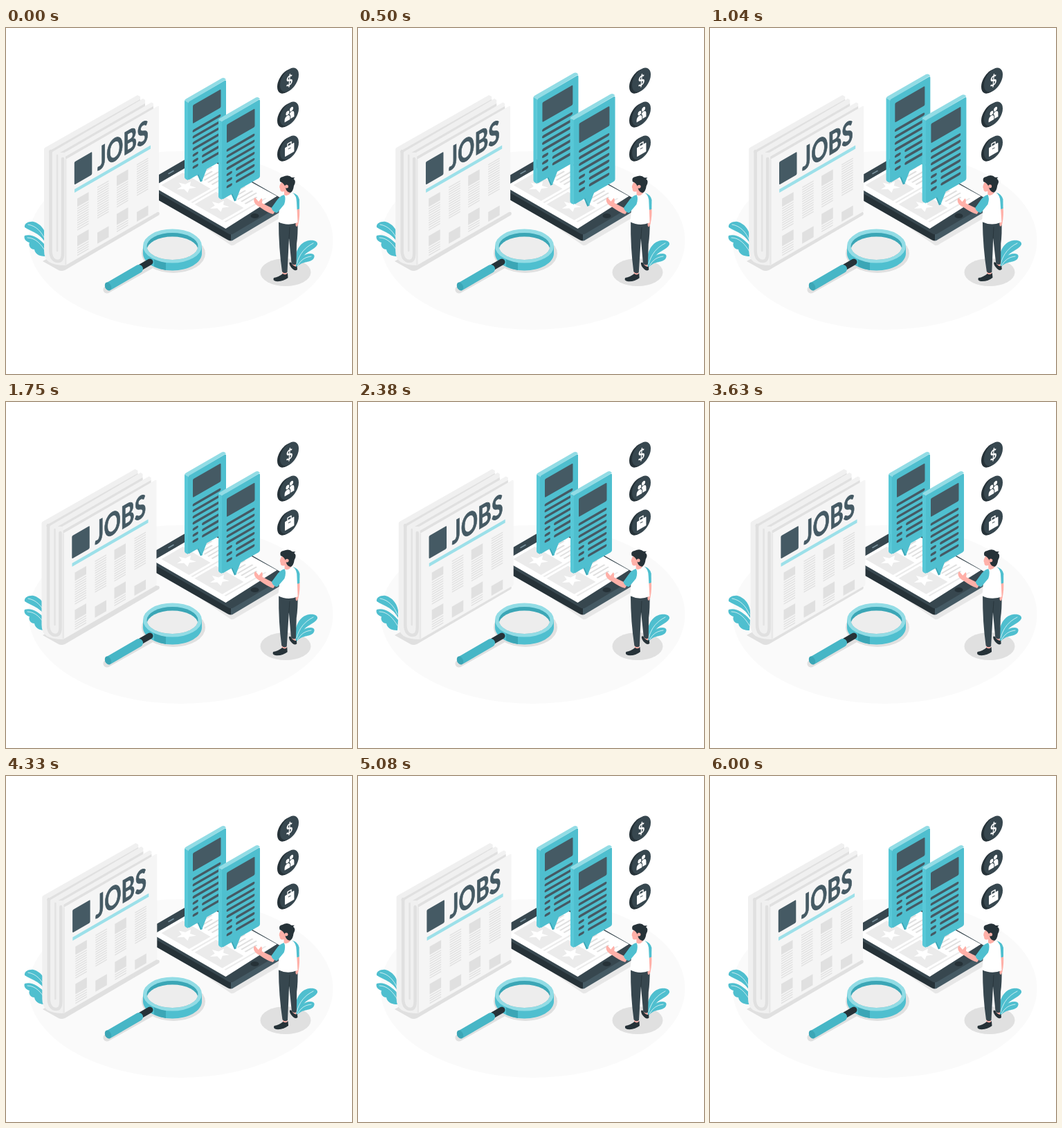
Write an HTML page that moves like this. It is 500x500 px and loops after 6.04 s.

```html
<!DOCTYPE html>
<html lang="en">
<head>
<meta charset="utf-8">
<title>Job search</title>
<style>
html, body { margin: 0; width: 100%; height: 100%; overflow: hidden; background: #fff; }
svg { display: block; width: 100%; height: 100%; }
.teal { fill: #4fbfcf; }
.pale { fill: #92dce5; }
.deep { fill: #3ba6b6; }
.ink { fill: #263238; }
.slate { fill: #37474f; }
.steel { fill: #455a64; }
.grey { fill: #e0e0e0; }
.page { fill: #f5f5f5; }
.skin { fill: #ffb0a8; }
.white { fill: #fff; }
.line { fill: none; stroke-linecap: round; stroke-linejoin: round; }
</style>
</head>
<body>
<svg viewBox="0 0 500 500">
  <defs>
    <g id="bubble">
      <path class="pale" d="M258 105.500Q258 103.500 260 102.500L312 72.500Q314 71.500 316 72.500L318 74.500L263 107.500Z"/>
      <path fill="#58c8d7" d="M258 105L263 107.500V220L259.500 218.200Q258 217 258 215.500Z"/>
      <path class="deep" d="M276 211L281 222.500L284 221L279 209Z"/>
      <path class="teal" d="M263 109Q263 107 265 106L316 76Q318 75 318 77V186Q318 188 316 189.200L290 204L283 222L278 211.500L265 219Q263 220 263 218Z"/>
      <g id="copy" transform="matrix(1 -.577 0 1 0 0)">
        <rect class="steel" x="270" y="267.500" width="40.500" height="26.500" rx="1.500"/>
      </g>
    </g>
    <g id="disc">
      <circle class="ink" r="15.600" transform="matrix(.866 -.5 0 1 405.500 77.200)"/>
      <circle class="ink" r="15.600" transform="matrix(.866 -.5 0 1 407.500 76.200)"/>
      <circle class="slate" r="15.600" transform="matrix(.866 -.5 0 1 409.500 75)"/>
    </g>
    <clipPath id="hole"><ellipse cx="240.500" cy="315.500" rx="37" ry="19.500"/></clipPath>
  </defs>

  <ellipse cx="252.500" cy="307" rx="220" ry="129" fill="#fafafa"/>

  <!-- left plant -->
  <path class="teal" d="M58 312C49 296 38 295 27 288C26 282 33 279 40 280C50 283 56 291 58 301Z"/>
  <path class="teal" d="M57 330C47 330 42 326 41 320C36 320 32 315 34 310C29 309 25 304 27 300C36 297 47 302 58 315Z"/>
  <path class="line" stroke="#fff" stroke-width=".7" d="M32 284C44 286 52 295 57 307M31 303C43 303 51 313 57 323"/>

  <!-- phone -->
  <path class="grey" opacity=".7" d="M205 232L325 314Q328 315 332 312L397 274V262L320 222Z"/>
  <path class="ink" d="M198 225L325 298V307.500Q323 307.500 320 306L198 236Z"/>
  <path class="steel" d="M325 298L404 252V258Q404 261 401 263L329 306Q327 307.500 325 307.500Z"/>
  <path class="slate" d="M201 223.500L276 180Q279.500 178 283 180L403 249Q407 251 403 253L329 297Q325 299.500 321 297L201 227Q197 225 201 223.500Z"/>
  <path class="white" d="M212.500 229.300L287 186L391.500 243L317.500 290Z"/>
  <path class="line" stroke="#78909c" stroke-width="1.600" d="M235 210.500L242 206.500"/>
  <ellipse class="ink" cx="359.500" cy="271.500" rx="6" ry="3.600"/>
  <g id="screen" transform="matrix(1 .577 1 -.577 212.500 229.300)"></g>

  <g id="bubbles"><use href="#bubble"/><use href="#bubble" x="49" y="28"/></g>

  <!-- newspaper -->
  <path class="grey" d="M53 337L76 350Q80 352 85 350L220 271Q223 269 221 266L190 260Z"/>
  <g id="paper">
    <path fill="#f0f0f0" d="M55 175Q55 173.500 57 172.500L190 97L194 99V190L86 343Q70 343 62 338Q55 333 55 322Z"/>
    <path class="grey" d="M62 178L194 103V180H62Z"/>
    <path fill="#f0f0f0" d="M67 179L198 102L201 104V190H67Z"/>
    <path class="grey" d="M73 183L201 109V190H73Z"/>
    <path fill="#f2f2f2" d="M76 185L210 107.500L213 109V200H76Z"/>
    <path class="grey" d="M82 188L213 113V200H82Z"/>
    <path fill="#f0f0f0" d="M67 180H86V335H67Z"/>
    <path class="line" stroke="#e0e0e0" stroke-width="4.500" stroke-linecap="butt" d="M64.500 178V322C64.500 333 70 337 75 337C80 337 82 333 82 326V189"/>
    <path class="line" stroke="#e3e3e3" stroke-width="2.500" d="M74 184V322"/>
    <path class="page" d="M86 190L219 113Q221 112 221 114V263Q221 265 219 266L86 343Z"/>
    <path fill="#e8e8e8" d="M85 190H87.500V342L85 343Z"/>
    <g id="columns" transform="matrix(1 -.577 0 1 0 0)">
      <rect class="steel" x="98.800" y="250.500" width="25.500" height="33" rx="1.500"/>
      <rect x="99" y="290" width="110" height="5" fill="#9ce0e9"/>
    </g>
    <text class="steel" stroke="#455a64" stroke-width=".9" transform="matrix(.67 -.388 0 1 132 206.500)" font-family="Lato, 'Open Sans', sans-serif" font-weight="700" font-size="45">JOBS</text>
  </g>

  <!-- magnifier -->
  <ellipse class="grey" cx="242" cy="326" rx="46" ry="28"/>
  <path class="line" stroke="#e0e0e0" stroke-width="11" d="M146 378L210 342"/>
  <path class="teal" d="M198 315V326C198 339 217 350.500 240.500 350.500S283 339 283 326V315Z"/>
  <path class="deep" d="M214 334V344.500Q222 348.500 231 350V339Z"/>
  <ellipse class="pale" cx="240.500" cy="315" rx="42.500" ry="24.500"/>
  <ellipse class="deep" cx="240.500" cy="315.500" rx="37" ry="19.500"/>
  <ellipse clip-path="url(#hole)" cx="240.500" cy="321" rx="37" ry="19.500" fill="#ededed"/>
  <path class="line" stroke="#263238" stroke-width="9" d="M195 345.500L208 338"/>
  <path class="line" stroke="#47b6c6" stroke-width="12" d="M149 373L192 348"/>
  <ellipse class="deep" cx="147.500" cy="373.500" rx="4.300" ry="6.300" transform="rotate(-25 147.500 373.500)"/>

  <!-- icons -->
  <use href="#disc"/><use href="#disc" y="49"/><use href="#disc" y="98"/>
  <text class="white" transform="matrix(.866 -.5 0 1 409.500 83)" text-anchor="middle" font-family="Lato, sans-serif" font-weight="700" font-size="20">$</text>
  <g class="white" transform="matrix(.866 -.5 0 1 409.500 124.500)">
    <circle cx="-3" cy="-3" r="2.900"/><circle cx="3.500" cy="-5.500" r="3"/>
    <path d="M-8 8V5Q-7.500 .5-3.500 .5Q0 .5 1 4V8ZM2 7.500V4Q1.500 1 0 0Q1-2 3.500-2Q8-2 8 3V7.500Z"/>
  </g>
  <g transform="matrix(.866 -.5 0 1 409.500 173.500)">
    <rect class="white" x="-7.500" y="-4" width="15.500" height="13" rx="1"/>
    <path class="line" stroke="#fff" stroke-width="1.500" d="M-3-4.500V-7.500H3V-4.500"/>
    <path class="line" stroke="#37474f" stroke-width=".9" d="M-1.500 .5H2"/>
  </g>

  <!-- man -->
  <ellipse class="grey" cx="404" cy="353" rx="36.500" ry="20"/>
  <path class="teal" d="M418 343C416 325 424 309 438 307C446 306 451 309 450 313C446 321 433 322 428 333L420 345Z"/>
  <path class="teal" d="M419 347C421 334 430 326 440 326C446 326 447 330 444 334C438 340 428 336 420 346Z"/>
  <path class="line" stroke="#fff" stroke-width=".7" d="M420 341C424 326 432 317 444 311M421 344C426 335 432 331 441 330"/>
  <g id="man">
    <path class="skin" d="M399 348H406V358L400 359ZM413 336H419V346L414 345Z"/>
    <path class="ink" d="M387 361Q394 360 400 355Q404 358 407 354L407.500 361Q400 367 390 366Q385 365 387 361ZM409.500 339Q412 337 414 342Q418 346 420.500 344L421 349Q418 352 414 348Q409 343 409.500 339Z"/>
    <path class="slate" d="M394 279H421.500Q422 299 420 312L419.500 341Q416 344 412.500 340L409 304L406.500 353Q402 356 399 352Q394 318 394 279Z"/>
    <path class="line" stroke="#263238" stroke-width=".8" d="M409 304L410 288"/>
    <path class="skin" d="M419 258L424 260Q425 270 422.500 283Q420 290 418.500 285Z"/>
    <path class="teal" d="M414 238Q422 240 424 248V261Q421 263.500 417 261Z"/>
    <path class="skin" d="M392 260L386 269Q378 267 367 259Q361 256 359 252Q357 247 360 245L365 251L369 246Q371 247 370 253L384 260Z"/>
    <path class="white" d="M402 239L414 238Q420 242 420 252L421.500 281Q407 287 393 280Q396 262 393 250Z"/>
    <path class="teal" d="M402 241Q395 243 390 251L383.500 260Q386 267 392 267L402 255Q405 246 402 241Z"/>
    <path class="skin" d="M397 224Q394 230 396 232Q396 238 402 236V241Q406 244 411 239L412 225L404 218Z"/>
    <path class="ink" d="M396 222Q394 216 400 215Q408 211 413 216L417.500 216L415.500 218Q420 221 416 228Q415 236 411 238Q405 237 404 231Q402 224 396 222Z"/>
    <circle class="skin" cx="405.500" cy="229" r="2.500"/>
  </g>
</svg>
<script>
const $ = id => document.getElementById(id);
const shape = (parent, tag, attrs) => {
  const el = document.createElementNS('http://www.w3.org/2000/svg', tag);
  for (const key in attrs) el.setAttribute(key, attrs[key]);
  $(parent).append(el);
};
const block = (parent, x, y, width, height, fill = '#e0e0e0') =>
  shape(parent, 'rect', { x, y, width, height, fill });

// Bubble text: four full lines, then three with a bullet
const rule = (x1, x2, y) => shape('copy', 'path', {
  d: `M${x1} ${y}H${x2}`, stroke: '#455a64', 'stroke-width': 3.8, 'stroke-linecap': 'round'
});
for (let i = 0; i < 7; i++) {
  const y = 305 + i * 8.8;
  if (i > 3) rule(271.5, 276, y);
  rule(i > 3 ? 285 : 271.5, 308.5, y);
}

// Newspaper columns: x, top, bottom, picture height
for (const [x, top, bottom, pic] of [
  [103, 306, 352, 12], [132, 306, 352, 0], [160, 306, 352, 15], [189, 306, 352, 0],
  [103, 360, 389, 15], [132, 372, 388, 16], [160, 361, 389, 16], [189, 375, 389, 14]
]) {
  if (pic) block('columns', x, top, 16.5, pic);
  for (let y = top + pic + (pic ? 2 : 0); y < bottom - 1; y += 3.4) block('columns', x, y, 16.5, 1.5);
}

// Phone listings
for (const a of [4, 52]) {
  block('screen', a, 8, 40, 31, '#ebebeb');
  const star = Array.from({ length: 10 }, (_, i) => {
    const r = i % 2 ? 4.6 : 10.5, q = i * Math.PI / 5 + Math.PI;
    return `${a + 20 + r * Math.cos(q)},${23.7 + r * Math.sin(q)}`;
  });
  shape('screen', 'polygon', { points: star.join(' '), fill: '#fff' });
  for (let i = 0; i < 7; i++) block('screen', a + 2 + i * 5.5, 45, 2, i % 3 ? 22 : 17);
  block('screen', a + 43, 8, 2, 59, '#ebebeb');
}

// Piecewise linear value from [time, value] pairs
const track = (keys, t) => {
  const i = keys.findIndex(k => k[0] >= t);
  if (i < 1) return keys[i < 0 ? keys.length - 1 : 0][1];
  const [t0, v0] = keys[i - 1], [t1, v1] = keys[i];
  return v0 + (v1 - v0) * (t - t0) / (t1 - t0);
};
const shake = [0, -1, 2, -4, 4, -4, 4, -4, 2, -1, 0].map((v, i) => [i * 600, v]);
const beat = [[0, 1], [600, 1.1], [900, 1.03], [1200, 1.1], [1500, 1], [2400, 1], [3000, 1.1], [3600, 1]];
const sway = [[0, 0], [375, 1], [1125, -1], [1500, 0]];

function draw(now) {
  const t = Math.min(now % 6040, 6000);
  $('paper').setAttribute('transform', `translate(${track(shake, t)})`);
  $('bubbles').setAttribute('transform', `translate(312.5 161) scale(${track(beat, t)}) translate(-312.5 -161)`);
  $('man').setAttribute('transform', `rotate(${track(sway, t % 1500)} 391.5 289.5)`);
}
const start = performance.now();
const loop = () => { draw(performance.now() - start); requestAnimationFrame(loop); };
loop();
</script>
</body>
</html>
```
